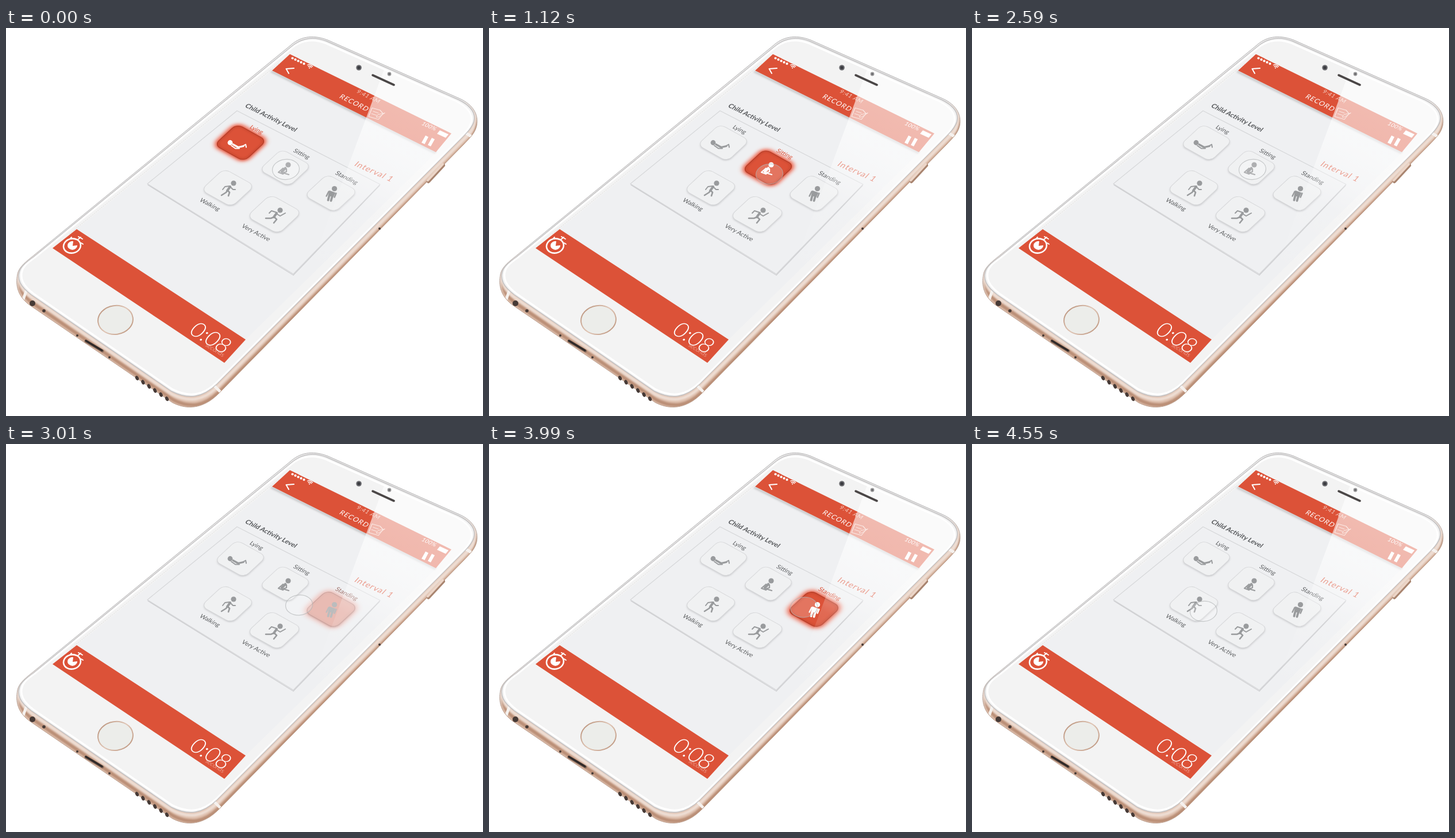
Animation, 830 px wide and 675 px high, one loop 4620 ms. Source, as an HTML page:

```html
<!DOCTYPE html>
<html lang="en">
<head>
<meta charset="utf-8">
<title>Activity recorder</title>
<style>
  html, body { margin: 0; width: 100%; height: 100%; overflow: hidden; background: #fff; }
  svg { display: block; width: 830px; height: 675px; font-family: Lato, "Open Sans", sans-serif; }
  .line { fill: none; stroke: currentColor; stroke-linecap: round; stroke-linejoin: round; }
</style>
</head>
<body>
<svg id="stage" viewBox="0 0 830 675"></svg>
<script>
const LOOP = 4620, STEP = 70;
const RED = '#dc5238', GREY = '#5c5e60', ICON = '#999b9d';

const OUTER = 'M20 428C22 418 30 410 44 399L494 31C510 16 532 10 560 21L790 123C812 133 823 150 819 170C816 184 806 192 796 203L372 634C350 657 322 668 290 652L44 484C20 468 16 448 20 428Z';
const FACE = 'M23 425C25 416 33 409 46 400L496 33C512 19 533 13 558 23L788 125C808 135 818 148 814 163C811 173 803 181 795 189L366 620C342 643 318 647 288 632L44 464C24 449 20 437 23 425Z';

const path = (d, attrs = '') => `<path d="${d}" ${attrs}/>`;
const line = (d, width, attrs = '') => path(d, `class="line" stroke-width="${width}" ${attrs}`);
const dot = (x, y, r, attrs = '') => `<circle cx="${x}" cy="${y}" r="${r}" ${attrs}/>`;

// Text lying in the tilted plane of the screen, anchored at its left baseline
function label(text, x, y, size, fill, { dir = 26.5, weight = 400, gap = 0, tall = 1 } = {}) {
  const a = dir * Math.PI / 180;
  const axes = [Math.cos(a), Math.sin(a), -.68 * tall, .74 * tall].map(v => v.toFixed(3));
  return `<text transform="matrix(${axes} ${x} ${y})" font-size="${size}" font-weight="${weight}" letter-spacing="${gap}" fill="${fill}">${text}</text>`;
}

// Icons are drawn around the centre of their button
const buttons = [
  { name: 'Lying', x: 408, y: 199.5, k: 1, tx: 423, ty: 174, size: 10.6,
    icon: dot(-18, 0, 4.4) + line('M-13 3L-4 8L5 6', 3.2) + line('M4 6L9 3L10 8M-16 5L-9 10L-2 10', 2) },
  { name: 'Sitting', x: 486, y: 243, k: 1, tx: 499, ty: 215, size: 10.6,
    icon: dot(5, -5, 4.6) + line('M0 1L-6 7', 4.5) + line('M-4 1L-12 8L-4 11M2 2L2 7L-4 9L6 12', 2.2) },
  { name: 'Standing', x: 565.5, y: 287.500, k: 1.03, tx: 572, ty: 254, size: 10.9,
    icon: dot(6, -8, 4.6) + path('M-3-5L8-1L4 7L-5 4Z') + line('M-4-3L-8 5M9 0L6 7', 2.4) + line('M-3 4L-5 12M2 6L0 13', 3.8) },
  { name: 'Walking', x: 386, y: 278, k: 1.03, tx: 336, ty: 301, size: 10.6, dir: 28,
    icon: dot(10, -8, 4.6) + line('M4-2L-1 5', 4) + line('M-1 5L-3 8L-11 13M0 5L3 8L1 14', 2.6) + line('M3-3L-5-2L-9 3M5-1L9 3L13 3', 2) },
  { name: 'Very Active', x: 467, y: 324, k: 1.06, tx: 409, ty: 346, size: 10.8, dir: 28,
    icon: dot(10, -7, 4.6) + line('M4-2L-1 5', 4) + line('M-1 5L-6 7L-15 7M0 5L4 9L-1 15', 2.6) + line('M4-3L-5-6L-9-2M5 0L10 3L19-2', 2) }
];

function button(b, i) {
  const axes = [.86, .48, -.72, .67].map(v => (v * b.k).toFixed(3));
  const rect = attrs => `<rect x="-30" y="-27" width="60" height="54" rx="11" transform="matrix(${axes} 0 0)" ${attrs}/>`;
  const caption = fill => label(b.name, b.tx, b.ty, b.size, fill, { dir: b.dir });
  const at = content => `<g transform="translate(${b.x} ${b.y})">${content}</g>`;
  return `<g id="off${i}">${caption(GREY)}</g>`
    + at(`<g transform="translate(0 2)">${rect('fill="#9c9ea1" opacity=".45" filter="url(#soft)"')}</g>`
      + rect('fill="#f0f1f2" stroke="#d6d7d9"')
      + `<g fill="${ICON}" color="${ICON}">${b.icon}</g>`)
    + `<g id="on${i}" opacity="0">${caption(RED)}`
    + at(rect('fill="#e8452b" stroke="#ee5a40" stroke-width="8" filter="url(#glow)"')
      + rect(`fill="${RED}" stroke="#b9402a" stroke-width="1.6"`)
      + `<g transform="scale(.94)">${rect('fill="none" stroke="#a93823" stroke-width="2" opacity=".4" filter="url(#soft)"')}</g>`
      + `<g fill="#fff" color="#fff">${b.icon}</g>`)
    + '</g>';
}

const defs = `<defs>
  <filter id="soft" x="-30%" y="-30%" width="160%" height="160%"><feGaussianBlur stdDeviation="1.5"/></filter>
  <filter id="glow" x="-40%" y="-40%" width="180%" height="180%"><feGaussianBlur stdDeviation="4"/></filter>
  <clipPath id="body">${path(OUTER)}</clipPath>
  <linearGradient id="metal" gradientUnits="userSpaceOnUse" x1="125" y1="357" x2="148" y2="423">
    <stop offset="0" stop-color="#e9e8e8"/><stop offset="1" stop-color="#dfc0ae"/>
  </linearGradient>
  <linearGradient id="rim" gradientUnits="userSpaceOnUse" x1="125" y1="357" x2="148" y2="423">
    <stop offset="0" stop-color="#b3b2b3"/><stop offset="1" stop-color="#b99a88"/>
  </linearGradient>
  <linearGradient id="glare" gradientUnits="userSpaceOnUse" x1="715" y1="100" x2="525" y2="435">
    <stop offset="0" stop-color="#fff" stop-opacity=".62"/>
    <stop offset=".3" stop-color="#fff" stop-opacity=".58"/>
    <stop offset=".45" stop-color="#fff" stop-opacity=".42"/>
    <stop offset=".6" stop-color="#fff" stop-opacity=".14"/>
    <stop offset="1" stop-color="#fff" stop-opacity="0"/>
  </linearGradient>
  <linearGradient id="ring" x1="0" y1="0" x2="1" y2="1">
    <stop offset="0" stop-color="#b58b73"/><stop offset=".5" stop-color="#e0c6b6"/><stop offset="1" stop-color="#b88e76"/>
  </linearGradient>
</defs>`;

function phone() {
  const holes = Array.from({ length: 6 }, (_, i) =>
    `<ellipse cx="${228 + i * 10.4}" cy="${609 + i * 7.2}" rx="2.8" ry="4.2" transform="rotate(-25 ${228 + i * 10.4} ${609 + i * 7.2})"/>`).join('');
  return `<g clip-path="url(#body)">`
    + path(OUTER, 'fill="url(#metal)"')
    + path(FACE, 'transform="translate(3 15)" fill="none" stroke="#b98d74" stroke-width="6" filter="url(#soft)"')
    + path(FACE, 'transform="translate(1 5)" fill="none" stroke="#efe0d7" stroke-width="5" filter="url(#soft)"')
    + line('M361 621L374 634M797 181L812 190M35 458L30 472', 5, 'color="#f5f1ee"')
    + '</g>'
    + path(OUTER, 'fill="none" stroke="url(#rim)" stroke-width="1"')
    + path(FACE, 'fill="#f3f3f3" stroke="#c3c2c3" stroke-width="1.5"')
    + path(FACE, 'fill="none" stroke="#fff" stroke-width="3" transform="translate(5 4) scale(.988)"')
    + line('M735 267L761 239', 6, 'color="#a98570"') + line('M734 265L760 237', 4, 'color="#ecd5c7"')
    + `<g fill="#463a36">${dot(46, 479, 5)}${dot(66, 492, 2.8)}${dot(124, 535, 2)}${dot(180, 573, 2)}${dot(650, 349, 2)}${holes}</g>`
    + line('M139 545L168 562', 5, 'color="#8d6f5f"') + line('M139 544L167 561', 3.4, 'color="#2f2928"')
    + '<ellipse cx="190.500" cy="508" rx="30.500" ry="25" transform="rotate(-8 190 508)" fill="#ecedea" stroke="url(#ring)" stroke-width="2"/>';
}

const earpiece = () => dot(614, 69, 4.8, 'fill="#6c6c70"') + dot(614, 69, 2.7, 'fill="#3a3b40"')
  + dot(667, 80, 3.4, 'fill="#9b9a9b"') + dot(667, 80, 1.7, 'fill="#66666a"')
  + line('M638 82L675 99', 3.6, 'color="#4b4747"');

function header() {
  const signal = Array.from({ length: 5 }, (_, i) => dot(498.5 + i * 5, 52.5 + i * 2.4, 2.1)).join('');
  return path('M463 74L750 215L746 219L460 77Z', 'fill="#777" opacity=".3" filter="url(#soft)"')
    + path('M494 45.500L775 183.500L748 216L463 74Z', `fill="${RED}"`)
    + `<g fill="#fff" color="#fff">${signal}`
    + line('M524.5 64.5Q529 62 533.5 67M526 67Q529 65.5 531.5 68.5', 1.4) + dot(528, 69.5, 1.1)
    + line('M501 70L487.500 71L492 79', 2)
    + path('M755 178L770 185L765 191L750 184Z') + path('M730 187L735 189.500L728.500 202L723 199.500ZM741 191L746 193.500L739 206L734 203.500Z')
    + '</g>'
    + `<g color="#f6cabf">${line('M637 139L651 143L656 149L648 159L631 154Z', 1.2)}${line('M639 145L648 148M636 149L645 152M659 148L648 155L644 155L647 151Z', 1)}</g>`
    + label('9:41 AM', 609, 112, 10, '#f6cfc5', { gap: .8 })
    + label('RECORD', 579, 121, 12, '#fff', { gap: 1.1 })
    + label('100%', 722, 168, 10, '#fff', { dir: 24, gap: .3 });
}

function footer() {
  return path('M123 350L417 542L380 582.500L81 383Z', `fill="${RED}"`)
    + '<ellipse cx="115" cy="379" rx="15" ry="12.500" transform="rotate(-12 115 379)" fill="none" stroke="#fff" stroke-width="2.6"/>'
    + path('M116 379L117 371A8.500 7.500 0 1 0 124 378Z', 'fill="#fff"')
    + line('M125 368L130 364M126 363L133 367M131 374L134 376M112 366L114 364', 2, 'color="#fff"')
    + label('0:08', 316, 530, 38, '#fff', { dir: 31, weight: 300, gap: -.8, tall: 1.03 })
    + label('seconds', 346, 553, 10.4, '#f8d5cc', { dir: 32, weight: 300 });
}

document.getElementById('stage').innerHTML = defs + phone()
  + path('M463 74L750 215L417 542L123 350Z', 'fill="#eff0f2"')
  + line('M474 62L108 360', 1, 'color="#dadada" stroke-dasharray="1 3"')
  + header() + footer()
  + path('M402 144L651 272L500 428L246 271Z', 'class="line" color="#d6d7d9" stroke-width="1.2"')
  + line('M247 273L500 430L650 274', 1.4, 'color="#b9babd" opacity=".6"')
  + label('Child Activity Level', 415, 137, 11.5, '#55575a', { weight: 700 })
  + label('Interval 1', 605, 239, 14.5, RED, { dir: 24, gap: 1.1 })
  + buttons.map(button).join('')
  + '<g id="touch"><ellipse rx="23.500" ry="17.500" transform="rotate(-6)" fill="#fff" fill-opacity=".2" stroke="#b0b2b4" stroke-opacity=".65" stroke-width="1.2"/></g>'
  + path('M658 72L797 135Q818 148 805 175L510 470Z', 'fill="url(#glare)"')
  + earpiece();

// Piecewise linear value through [time, ...values] keys
function track(keys, t) {
  const n = keys.findIndex(k => k[0] > t);
  if (n < 0) return keys.at(-1).slice(1);
  if (n === 0) return keys[0].slice(1);
  const [a, b] = [keys[n - 1], keys[n]];
  const p = (t - a[0]) / (b[0] - a[0]);
  return a.slice(1).map((v, i) => v + (b[i + 1] - v) * p);
}

const lit = [
  [[0, 1], [140, 1], [420, 0]],
  [[210, 0], [490, 1], [1820, 1], [2240, 0]],
  [[2940, 0], [3150, 1], [4060, 1], [4270, 0]]
];
const finger = [
  [0, 487, 246], [210, 487, 246], [630, 486, 256], [1120, 488, 254], [1680, 491, 249],
  [2240, 488, 246], [2590, 488, 246], [2870, 510, 275], [3220, 510, 288],
  [3500, 528, 287], [3990, 548, 284], [4060, 546, 284], [4340, 410, 291], [4550, 403, 291]
];
const find = id => document.getElementById(id);
const touch = find('touch');

function frame(now) {
  const t = Math.floor(now % LOOP / STEP) * STEP;
  lit.forEach((keys, i) => {
    const [level] = track(keys, t);
    find('on' + i).setAttribute('opacity', level);
    find('off' + i).setAttribute('opacity', 1 - level);
  });
  touch.setAttribute('transform', `translate(${track(finger, t)})`);
  requestAnimationFrame(frame);
}
frame(performance.now());
</script>
</body>
</html>
```
